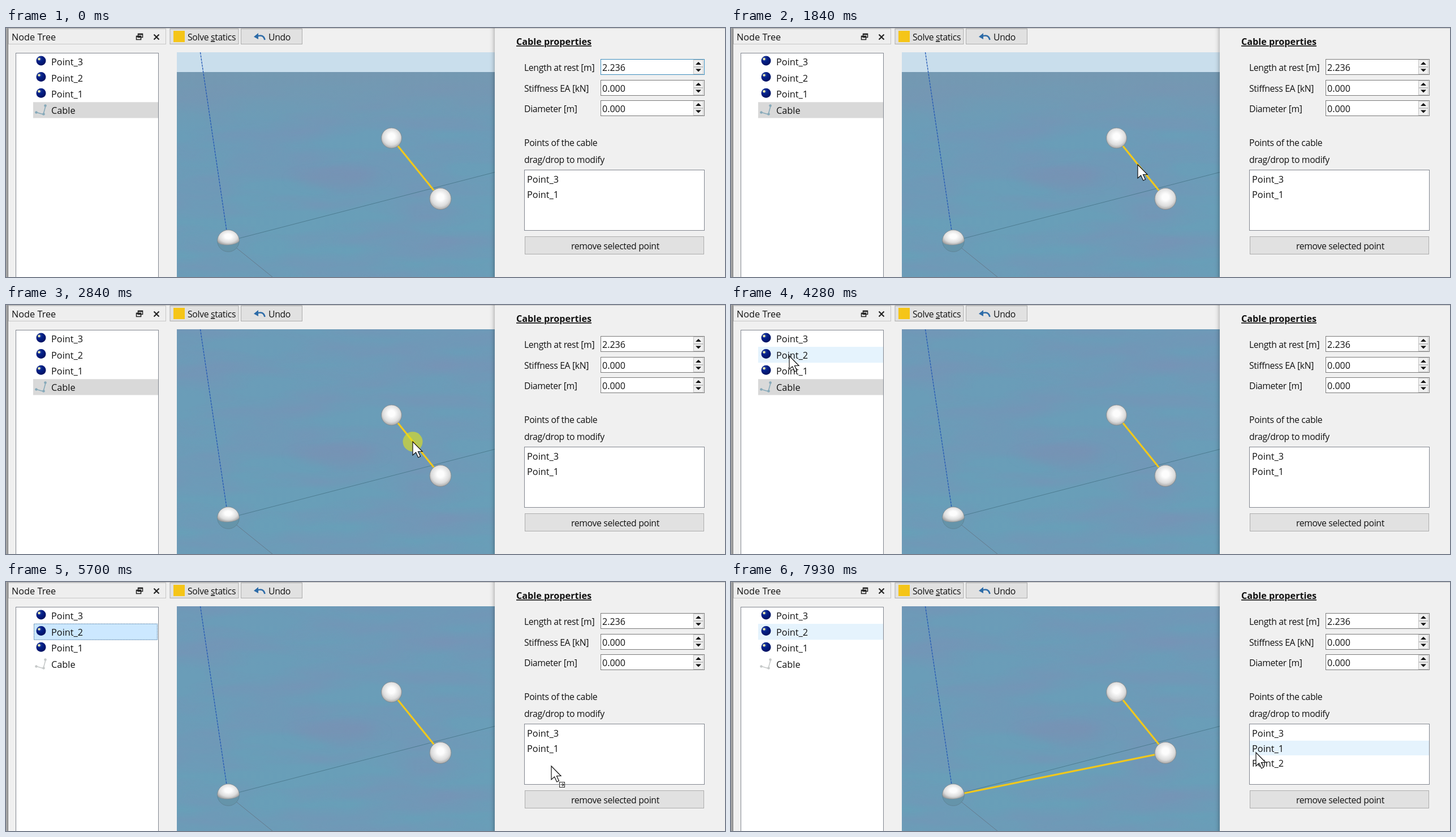
Recreate the animation shown at these times as an HTML page. Size 1271x441 px, loop 8 s.

```html
<!DOCTYPE html>
<html lang="en">
<head>
<meta charset="utf-8">
<title>Cable editor</title>
<style>
  html, body { margin: 0; width: 100%; height: 100%; overflow: hidden; background: #f0f0f0; }
  svg { display: block; width: 1271px; height: 441px; }
  text { font: 16.3px "Open Sans", "Noto Sans", sans-serif; fill: #111; white-space: pre; }
  .ui { font-size: 15.75px; letter-spacing: -.33px; }
  .title { font-size: 16.2px; font-weight: 700; text-decoration: underline; }
  .num { font-size: 16px; }
  .btn { fill: #e1e1e1; stroke: #adadad; }
  .box { fill: #fff; stroke: #828790; }
</style>
</head>
<body>
<svg id="stage" viewBox="0 0 1271 441"></svg>
<script>
const LOOP = 8000;
const stage = document.getElementById('stage');

const rect = (x, y, w, h, attrs) => `<rect x="${x}" y="${y}" width="${w}" height="${h}" ${attrs}/>`;
const text = (x, y, s, cls = '') => `<text x="${x}" y="${y}" class="${cls}">${s}</text>`;
const path = (d, attrs) => `<path d="${d}" ${attrs}/>`;
const circle = (x, y, r, attrs) => `<circle cx="${x}" cy="${y}" r="${r}" ${attrs}/>`;
const group = (id, ...parts) => `<g id="${id}">${parts.join('')}</g>`;

const rowY = i => 45.5 + i * 28.6;

function treeRow(name, i) {
  const y = 59 + i * 28.6;
  const icon = name === 'Cable'
    ? `<g id="cableIcon" stroke="#999" fill="#999">` +
      path('M54 149.500L66 153L70 138', 'fill="none" stroke-width="1.6"') +
      circle(53.5, 149.5, 2.3, 'stroke="none"') + circle(66.5, 152.5, 2.3, 'stroke="none"') +
      circle(69.5, 137.5, 2.3, 'stroke="none"') + '</g>'
    : circle(62, y - 1, 8.5, 'fill="url(#navy)"') + circle(58.5, y - 4, 2.2, 'fill="#e9e9b0"');
  return rect(48, rowY(i), 221, 28.2, `id="row${i}" fill="none"`) + icon + text(80, y + 7, name);
}

function spinBox(x, y, value, id) {
  const arrow = (cy, s) =>
    path(`M${x + 168} ${cy + 2.5 * s}h10l-5 ${-5 * s}z`, 'fill="#111"');
  return rect(x + .5, y + .5, 183, 27, `id="${id}" fill="#fff" stroke="#7a7a7a"`) +
    rect(x + 164.5, y + 1.5, 17, 12, 'fill="#f0f0f0" stroke="#c4c4c4"') +
    rect(x + 164.5, y + 14.5, 17, 12, 'fill="#f0f0f0" stroke="#c4c4c4"') +
    arrow(y + 7.5, 1) + arrow(y + 20, -1) + text(x + 3, y + 20.5, value, 'num');
}

const fields = (x, prefix, list) => list.map(([label, value], i) =>
  text(916, 76 + i * 36.5, label, 'ui') + spinBox(x, 55 + Math.round(i * 36.7), value, prefix + i)).join('');

const ball = (x, y, r, id) => circle(x, y, r, `id="${id}" fill="url(#white)" stroke="#80868a" stroke-width=".8"`);
const line = (d, color, width, attrs = '') => path(d, `fill="none" stroke="${color}" stroke-width="${width}" ${attrs}`);

const defs = `<defs>
  <radialGradient id="white" cx=".5" cy=".42" r=".6"><stop offset=".25" stop-color="#fdfdfd"/><stop offset=".7" stop-color="#dcdcdc"/><stop offset="1" stop-color="#a2a2a2"/></radialGradient>
  <radialGradient id="gold" cx=".5" cy=".42" r=".6"><stop offset=".25" stop-color="#f2cb08"/><stop offset=".7" stop-color="#dcb404"/><stop offset="1" stop-color="#a37c00"/></radialGradient>
  <radialGradient id="navy" cx=".35" cy=".3" r=".8"><stop offset="0" stop-color="#3a55a0"/><stop offset=".35" stop-color="#04208a"/><stop offset="1" stop-color="#000f58"/></radialGradient>
  <linearGradient id="sea" x2="0" y2="1"><stop offset="0" stop-color="#6b9cb8"/><stop offset="1" stop-color="#689fb8"/></linearGradient>
  <linearGradient id="haze" x2="0" y2="1"><stop offset="0" stop-color="#7698b0" stop-opacity=".8"/><stop offset="1" stop-color="#7698b0" stop-opacity="0"/></linearGradient>
  <filter id="waves" x="0" y="0" width="1" height="1" color-interpolation-filters="sRGB">
    <feTurbulence type="fractalNoise" baseFrequency=".005 .022" numOctaves="3" seed="8"/>
    <feColorMatrix values="0 0 0 0 .49  0 0 0 0 .56  0 0 0 0 .71  1.8 0 0 0 -.6"/>
  </filter>
  <filter id="soft" x="-.5" y="-.9" width="2" height="2.8"><feGaussianBlur stdDeviation="14 7"/></filter>
  <filter id="shadow" x="-.1" y="-.1" width="1.2" height="1.2"><feDropShadow dx="0" dy="1" stdDeviation="4" flood-opacity=".4"/></filter>
  <clipPath id="view"><rect x="302" y="43" width="969" height="398"/></clipPath>
</defs>`;

const scene = `<g clip-path="url(#view)">` +
  rect(302, 43, 969, 398, 'fill="url(#sea)"') +
  rect(302, 43, 969, 398, 'filter="url(#waves)" opacity=".65"') +
  '<ellipse cx="585" cy="267" rx="70" ry="16" fill="#7b8fb2" opacity=".55" filter="url(#soft)"/>' +
  group('sky', rect(302, 78, 969, 110, 'fill="url(#haze)"'), rect(302, 43, 969, 35, 'fill="#c9deec"')) +
  line('M343.500 43L390 359', '#2459b5', 1.3, 'stroke-dasharray="4 1.5"') +
  line('M410 373L941 235.500', '#4d7c91', 1) +
  line('M403 386L471 441', '#647a8c', 1) +
  line('M681.500 195L768 302', '#f1c81c', 3.2, 'id="cable"') +
  line('M768 302L393 378', '#f1c81c', 3.2, 'id="extension"') +
  ball(681.5, 195, 18, 'topBall') + ball(768, 302.5, 19, 'midBall') +
  circle(393, 377, 19.3, 'fill="#6594aa" stroke="#5d7f90" stroke-width=".8"') +
  path('M373.700 377A19.300 19.300 0 0 1 412.300 377Q411 380 405 382Q393 386 380 383Q374 381 373.700 377Z',
    'fill="url(#white)" stroke="#8a8f92" stroke-width=".6"') + '</g>';

const toolbar =
  rect(0, 0, 3, 441, 'fill="#a3a3a3"') + rect(3, 0, 1, 441, 'fill="#777"') +
  rect(4, 0, 1267, 1, 'fill="#bdbdbd"') +
  rect(4.5, 1.5, 278, 27, 'fill="#eee" stroke="#c6c6c6"') + text(10, 22, 'Node Tree') +
  path('M233.500 10.500h8v6h-8zM230.500 14.500h8v6h-8z', 'fill="#eee" stroke="#222" stroke-width="1.5"') +
  path('M233 11h9M230 15h9', 'stroke="#222" stroke-width="2.4"') +
  path('M261.500 11.500l9 9m0 -9l-9 9', 'stroke="#222" stroke-width="2.2"') +
  rect(290, 1.5, 121, 27, 'class="btn"') + rect(296, 5, 20, 20, 'fill="#f5c518"') +
  text(321, 22, 'Solve <tspan text-decoration="underline">s</tspan>tatics', 'ui') +
  rect(415.5, 1.5, 108, 27, 'class="btn"') +
  line('M443 15Q455 10 457.500 21', '#2d6ca8', 2.6) + path('M438 15.500l8 -6.500v11z', 'fill="#2d6ca8"') +
  text(464, 22, 'Undo', 'ui') + circle(1265, 15, 8, 'fill="#e58a1f"');

const tree = rect(17.5, 44.5, 252, 420, 'class="box"') +
  ['Point_3', 'Point_2', 'Point_1', 'Cable'].map(treeRow).join('');

const cablePanel = group('cablePanel',
  rect(864, -20, 440, 500, 'fill="#f0f0f0" filter="url(#shadow)"'),
  rect(864, 0, 407, 1, 'fill="#c4c4c4"'),
  text(902, 30, 'Cable properties', 'title'),
  fields(1051, 'cableField', [['Length at rest [m]', '2.236'], ['Stiffness EA [kN]', '0.000'], ['Diameter [m]', '0.000']]),
  text(916, 209, 'Points of the cable', 'ui'), text(916, 239, 'drag/drop to modify', 'ui'),
  rect(916.5, 251.5, 318, 107, 'class="box"'),
  rect(917, 281, 317, 26, 'id="listHover" fill="#e5f3fd"'),
  text(921, 274, 'Point_3'), text(921, 300.5, 'Point_1'),
  `<g id="listNew">${text(921, 327, 'Point_2')}</g>`,
  rect(917.5, 369.5, 316, 31, 'class="btn"'), text(999, 392, 'remove selected point', 'ui'));

const pointPanel = group('pointPanel',
  rect(864, -20, 378, 229, 'fill="#f0f0f0" filter="url(#shadow)"'),
  text(902, 30, 'Position on parent', 'title'),
  fields(1006, 'pointField', [['X - position', '1.000'], ['Y - position', '4.000'], ['Z - position', '2.000']]));

const pointer = circle(0, 0, 17.5, 'id="click" fill="#e3e31c" opacity=".62"') +
  group('cursor',
    path('M0 0V24L5.500 19L9.700 28L13.500 26.300L9.500 17.500H17Z', 'fill="#fff" stroke="#111" stroke-width="1.2"'),
    group('dropBadge', rect(14.5, 28.5, 9, 9, 'fill="#fff" stroke="#222"'),
      path('M16 33h6m-2.500 -2.500l2.500 2.500l-2.500 2.500', 'fill="none" stroke="#222" stroke-width="1.2"')));

stage.innerHTML = defs + scene + toolbar + tree + cablePanel + pointPanel + pointer;

const $ = id => document.getElementById(id);
const show = (id, on) => $(id).setAttribute('visibility', on ? 'inherit' : 'hidden');
const set = (id, attrs) => { for (const k in attrs) $(id).setAttribute(k, attrs[k]); };

// Pointer positions, held until the next entry: time, x, y
const moves = [
  [200, 846, 408], [400, 822, 376], [600, 790, 332], [800, 756, 288], [1000, 732, 258], [1220, 721, 245],
  [1420, 720, 238], [1640, 719, 244], [1840, 719, 242],
  [3660, 740, 268], [3860, 753, 282], [4080, 300, 170], [4280, 103, 90], [4480, 104, 89], [4680, 103, 90],
  [4880, 170, 112], [5100, 420, 205], [5300, 730, 285], [5500, 925, 320], [5700, 964, 326],
  [6710, 942, 299], [7330, 770, 236], [7530, 526, 292], [7730, 770, 298], [7930, 928, 302]
];

function draw(t) {
  const at = (from, to = LOOP) => t >= from && t < to;
  const pointSelected = at(2240, 2840);
  const dragging = at(4680, 6710);
  const added = at(6710);
  const cableSelected = !pointSelected && t < 4680;

  show('sky', t < 2240);
  show('cablePanel', !pointSelected);
  show('pointPanel', pointSelected);
  set('cable', pointSelected ? { stroke: '#111', 'stroke-width': 2.3 } : { stroke: '#f1c81c', 'stroke-width': 3.2 });
  set('topBall', { fill: `url(#${pointSelected ? 'gold' : 'white'})` });
  show('extension', added);
  show('listNew', added);
  show('listHover', at(6710, 7330) || at(7930));
  set('cableField0', { stroke: t < 200 ? '#3c8dbd' : '#7a7a7a' });

  set('row0', { fill: pointSelected ? '#d9d9d9' : 'none' });
  set('row1', {
    fill: dragging ? '#cce8ff' : at(4280, 4680) || added ? '#e5f3fd' : 'none',
    stroke: dragging ? '#3f6f99' : 'none',
    'stroke-dasharray': '1.5 1',
    x: dragging ? 49.5 : 48, width: dragging ? 218 : 221
  });
  set('row3', { fill: cableSelected ? '#d9d9d9' : 'none' });
  const iconColor = cableSelected ? '#86a9b9' : '#c6c9c9';
  set('cableIcon', { stroke: iconColor, fill: iconColor });

  const spot = moves.findLast(m => m[0] <= t);
  show('cursor', spot);
  show('dropBadge', at(4880, 6710));
  show('click', at(2840, 3060) || at(4680, 4880));
  if (spot) {
    const transform = `translate(${spot[1]} ${spot[2]})`;
    set('cursor', { transform });
    set('click', { transform });
  }
}

const start = performance.now();
function tick() {
  draw((performance.now() - start) % LOOP);
  requestAnimationFrame(tick);
}
tick();
</script>
</body>
</html>
```
